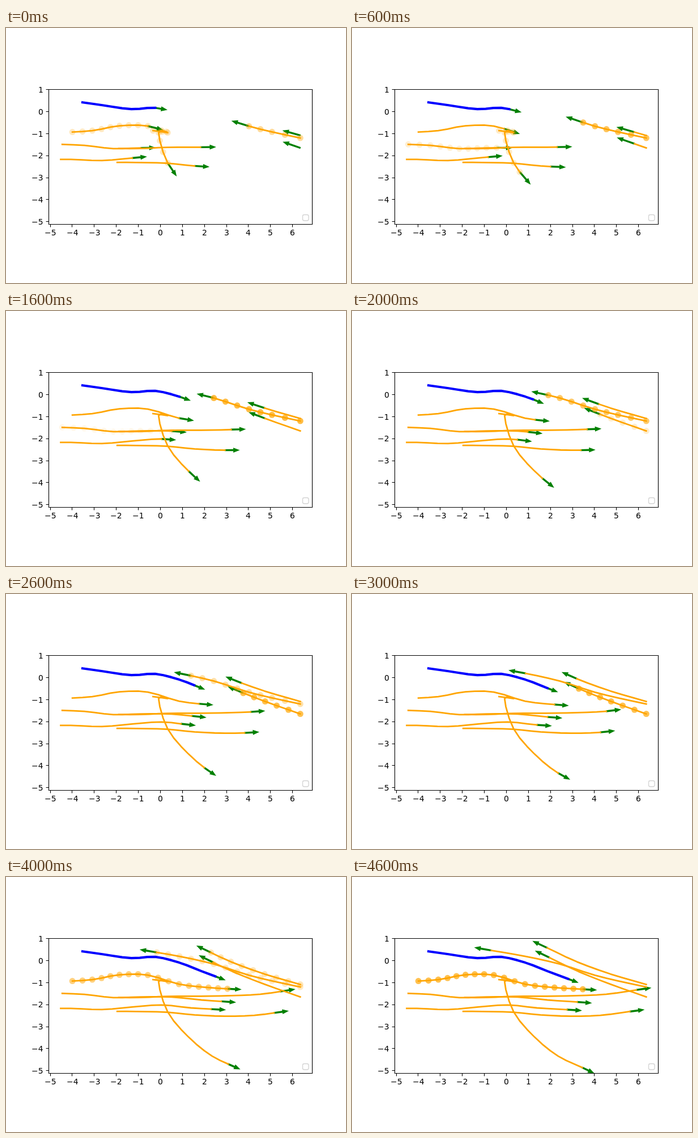
Write an HTML page with a canvas that moves like this. It is 600x450 px and loops after 5 s.

```html
<!DOCTYPE html>
<html lang="en">
<head>
<meta charset="utf-8">
<title>Trajectories</title>
<style>
  html, body { margin: 0; width: 100%; height: 100%; overflow: hidden; background: #fff; }
  canvas { display: block; }
</style>
</head>
<body>
<canvas id="plot" width="600" height="450"></canvas>
<script>
const ctx = document.getElementById('plot').getContext('2d');
const ORANGE = '#ffa500', GREEN = '#008000', BLUE = '#0000ff';
const AXES = { left: 75.5, right: 540.5, top: 108.5, bottom: 346.5 };
const ORIGIN = { x: 272.4, y: 147.4 }, UNIT = 38.87;
const KEY_GAP = 3; // steps between two key points
const tracks = [];

// A bump that rises to `height` at step `center` and is gone `width` steps away.
const bump = (center, width, height) => step =>
  height * Math.max(0, 1 - ((step - center) / width) ** 2);

// keys: one "x,y" every KEY_GAP steps, the last at step 9; the visible path begins at step `from`.
function track(from, keys, { glow = [], color = ORANGE, width = 2.78 } = {}) {
  tracks.push({ from, keys: keys.split(' ').map(p => p.split(',').map(Number)), glow, color, width });
}

track(-8, '99,184 152,180.5 200,172 250,172.5 305,188.5 357,194.5 407,197.5',
  { glow: [bump(-0.5, 1.2, 0.3), bump(10, 3.5, 0.75)] });
track(-8, '79,204 138,206.5 189,212.3 237,211 292,211.3 344.7,216.4 397,220',
  { glow: [bump(1.8, 1.5, 0.25)] });
track(-8, '243,178.4 285,184 269,184 285,237.5 322,282 363.5,315.5 406,335.7',
  { glow: [bump(0, 3, 0.25)] });
track(-8, '179,212 237,212 285,210 343,209.8 397,208.7 448.5,206.3 501.5,198.7');
track(-7, '61,232 114,231.3 169,233.3 222.5,228.8 274,225.2 326,230.4 379,233.5');
track(-8, '179,236.5 230,236.8 284,238 332.5,242.8 386,245 438,243.5 490,236.8');
track(-4, '578,205.4 492,187.8 428.5,172.7 366.5,153 306,139.5 245.5,129',
  { glow: [bump(2.4, 3.5, 0.75), bump(7.6, 1.2, 0.27)] });
track(0, '519,189 456,170.7 396.5,149 344.2,124.5', { glow: [bump(7.2, 1.2, 0.5)] });
track(0, '519,211 457,189 400,166.5 348.3,141.7', { glow: [bump(5.5, 1.75, 0.75)] });
track(-8, '117,128 170,135.7 221,142.6 263,140.3 305.5,150.5 344.5,165.5 381,179.2',
  { color: BLUE, width: 4.17 });

// Catmull-Rom position at a step; past the last key the path goes on straight.
function position({ keys }, step) {
  const last = keys.length - 1;
  const u = (step - 9) / KEY_GAP + last;
  const i = Math.floor(u), t = u - i;
  return [0, 1].map(axis => {
    const key = n => n < 0 ? 2 * keys[0][axis] - keys[1][axis]
      : n > last ? keys[last][axis] + (n - last) * (keys[last][axis] - keys[last - 1][axis])
      : keys[n][axis];
    const [a, b, c, d] = [-1, 0, 1, 2].map(n => key(i + n));
    return b + t / 2 * (c - a + t * (2 * a - 5 * b + 4 * c - d + t * (3 * (b - c) + d - a)));
  });
}

function drawLine(points, color, width) {
  ctx.strokeStyle = color;
  ctx.lineWidth = width;
  ctx.lineJoin = 'round';
  ctx.lineCap = 'square';
  ctx.beginPath();
  points.forEach(p => ctx.lineTo(...p));
  if (points.length > 1) ctx.stroke();
}

function drawArrow([x, y], [nextX, nextY]) {
  const dx = nextX - x, dy = nextY - y;
  const length = Math.hypot(dx, dy) * 1.45 + 1;
  const neck = length - 11.5;
  ctx.save();
  ctx.translate(x, y);
  ctx.rotate(Math.atan2(dy, dx));
  ctx.fillStyle = GREEN;
  ctx.fillRect(-0.5, -1.7, neck + 1, 3.4);
  ctx.beginPath();
  ctx.moveTo(length, 0);
  ctx.lineTo(neck, -4.4);
  ctx.lineTo(neck, 4.4);
  ctx.fill();
  ctx.restore();
}

function drawDots(points, opacity) {
  ctx.fillStyle = ORANGE;
  ctx.globalAlpha = opacity;
  for (const [x, y] of points) {
    ctx.beginPath();
    ctx.arc(x, y, 5.5, 0, 2 * Math.PI);
    ctx.fill();
  }
  ctx.globalAlpha = 1;
}

function drawAxes() {
  const { left, right, top, bottom } = AXES;
  const snap = v => Math.floor(v) + 0.5;
  const label = (n, x, y, shift) => {
    const text = String(n).replace('-', '\u2212');
    ctx.fillText(text, Math.round(x - ctx.measureText(text).width * shift), Math.round(y));
  };
  ctx.strokeStyle = ctx.fillStyle = '#000';
  ctx.lineWidth = 1.11;
  ctx.lineCap = 'butt';
  ctx.lineJoin = 'miter';
  ctx.font = '13.89px "DejaVu Sans", sans-serif';
  ctx.beginPath();
  ctx.rect(left, top, right - left, bottom - top);
  for (let n = -5; n <= 6; n++) {
    const x = ORIGIN.x + n * UNIT;
    ctx.moveTo(snap(x), bottom);
    ctx.lineTo(snap(x), bottom + 4.9);
    label(n, x, 366, 0.5);
  }
  for (let n = -5; n <= 1; n++) {
    const y = ORIGIN.y - n * UNIT;
    ctx.moveTo(left, snap(y));
    ctx.lineTo(left - 4.9, snap(y));
    label(n, left - 9.7, y + 5.3, 1);
  }
  ctx.stroke();

  ctx.strokeStyle = '#d4d4d4';
  ctx.lineWidth = 1.39;
  ctx.beginPath();
  ctx.roundRect(523.5, 329.5, 10.5, 10.5, 2.8);
  ctx.stroke();
}

function draw(step) {
  ctx.fillStyle = '#fff';
  ctx.fillRect(0, 0, 600, 450);
  ctx.save();
  ctx.translate(0.3, 0.6);
  const trails = tracks.map(t =>
    Array.from({ length: step - t.from + 1 }, (_, i) => position(t, t.from + i)));
  tracks.forEach((t, i) => drawArrow(trails[i].at(-1), position(t, step + 1)));
  tracks.forEach((t, i) => drawDots(trails[i], t.glow.reduce((sum, g) => sum + g(step), 0)));
  tracks.forEach((t, i) => drawLine(trails[i], t.color, t.width));
  ctx.restore();
  drawAxes();
}

const start = performance.now();
function tick() {
  // Each second holds two steps: 600 ms, then 400 ms.
  const time = (performance.now() - start) % 5000;
  draw(2 * Math.floor(time / 1000) + (time % 1000 >= 600 ? 1 : 0));
  requestAnimationFrame(tick);
}
tick();
</script>
</body>
</html>
```
